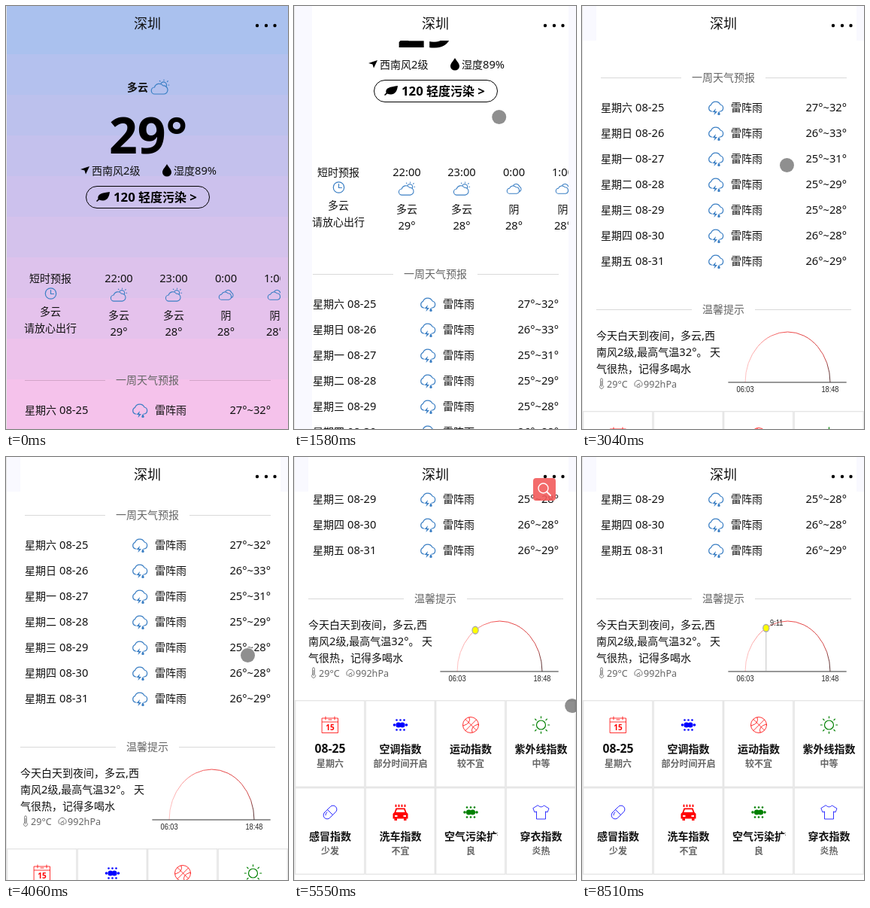
Write an HTML page that moves like this. It is 375 px wide and 562 px high and loops after 8600 ms.

```html
<!DOCTYPE html>
<html lang="zh-CN">
<head>
<meta charset="utf-8">
<title>天气</title>
<style>
html, body { margin: 0; width: 100%; height: 100%; overflow: hidden; background: #fff; }
svg { display: block; width: 375px; height: 562px; }
text { font-family: "Noto Sans", "Noto Sans CJK SC", "Noto Sans CJK", sans-serif; white-space: pre; }
.chart text { font-family: "Liberation Sans", sans-serif; font-size: 10px; fill: #222; }
.line { fill: none; stroke: currentColor; stroke-width: 1.2; stroke-linecap: round; stroke-linejoin: round; }
.thin .line { stroke-width: .8; }
.solid { fill: currentColor; }
</style>
</head>
<body>
<svg id="stage" viewBox="0 0 375 562"></svg>
<script>
const LOOP = 8600, BLUE = '#3b7fc4';

// Latin runs are set slightly larger than the Chinese glyphs around them.
const text = (x, y, str, size = 14, { at = 'middle', fill = '#111', bold = false } = {}) =>
  `<text x="${x}" y="${y}" font-size="${size}" text-anchor="${at}" fill="${fill}" font-weight="${bold ? 700 : 400}">` +
  str.replace(/[!-~°]+/g, run => `<tspan font-size="${size * 1.05}">${run}</tspan>`) + '</text>';
const left = { at: 'start' };
const icon = (name, x, y, color = BLUE, scale = 1) =>
  `<g transform="translate(${x} ${y}) scale(${scale})" color="${color}">${icons[name]}</g>`;
const line = d => `<path class="line" d="${d}"/>`;
const solid = d => `<path class="solid" d="${d}"/>`;
const thin = body => `<g class="thin">${body}</g>`;
const dot = (x, y, r) => `<circle class="solid" cx="${x}" cy="${y}" r="${r}"/>`;
const ring = r => `<circle class="line" r="${r}"/>`;
const rays = (n, a, b) => Array.from({ length: n }, (_, i) =>
  `<path class="line" d="M0-${a}V-${b}" transform="rotate(${i * 360 / n})"/>`).join('');
const rule = (x1, x2, y) => `<path d="M${x1} ${y}H${x2}" stroke="#000" stroke-opacity=".15"/>`;

const icons = {
  sunny: line('M-7 9A4.5 4.5 0 0 1-7.5 0A6.5 6.5 0 0 1 4-2A5.5 5.5 0 0 1 5 9Z') +
    line('M1-5A3.8 3.8 0 1 1 8-1M5-9.2v-.8M9.5-7.5l.8-.8M11-3h.8M0-8l-.7-.7'),
  cloudy: line('M-6 7A4 4 0 0 1-6.5-1A5.6 5.6 0 0 1 3-2.5A4.8 4.8 0 0 1 4 7Z') +
    line('M-1-5A5 5 0 0 1 8-3.5A4 4 0 0 1 8 4'),
  storm: line('M-5 5H-6A4.5 4.5 0 0 1-6.5-3.5A6.8 6.8 0 0 1 6-4A4.6 4.6 0 0 1 6 5H5') +
    solid('M0 1L-4.5 6h3l-1 4L2 5h-3z') + solid('M4 5q3.5 5 0 5t0-5z'),
  clock: ring(7.2) + line('M0-4.5V.5H4'),
  arrow: solid('M6-5L1 5.5L-.5.5L-6-1z'),
  drop: solid('M0-8C2-4 6-1 6 3A6 5.6 0 0 1-6 3C-6-1-2-4 0-8z'),
  leaf: solid('M9-6.5C8 3 3 7-5 4L-8 6.5L-9 5.5L-6.5 3C-8-4-1-5 9-6.5z'),
  thermo: thin(line('M-1.5 2V-6.5a1.5 1.5 0 0 1 3 0V2a2.8 2.8 0 1 1-3 0zM0-4V4')),
  gauge: thin(line('M-4 2.5A5 5 0 1 1 4 2.5M0 0L2-2M-2 3a2.3 2.3 0 1 1 4 0z')),
  calendar: thin(line('M-10.5-9H10.5V10.5H-10.5zM-10.5-4H10.5M-6-11v4M6-11v4M-2-7h4')) +
    '<text y="7" font-size="10" font-weight="600" text-anchor="middle" fill="currentColor">15</text>',
  dots: dot(-2.6, 0, 3.5) + dot(2.6, 0, 3.5) + dot(-8, 0, 1.8) + dot(8, 0, 1.8) +
    [-5, 0, 5].map(x => dot(x, -6.5, 1.3) + dot(x, 6.5, 1.3)).join(''),
  ball: thin(ring(10.5) + line('M-7-7.5L7.5 7M7.5-7L-7 7.5M-2-10Q1-2-10 1M2 10Q-1 2 10-1')),
  sun: `<g stroke-width="1.6">${ring(6)}${rays(8, 9.2, 11.2)}</g>`,
  pill: thin(`<g transform="rotate(-45)"><rect class="line" x="-10.5" y="-5" width="21" height="10" rx="5"/>${line('M0-5V5M-7-1.5Q-6-3-3-3')}</g>`),
  car: solid('M-8 0L-6-5.5H6L8 0L10 2V8.5H8V11H4.5V8.5H-4.5V11H-8V8.5H-10V2z') +
    '<path d="M-6 0L-4.7-3.8H4.7L6 0zM-7.5 4h3.5v2h-3.5zM4 4h3.5v2H4z" fill="#fff"/>' +
    [-6, -2, 2, 6].map(x => solid(`M${x}-11q2.4 4 0 4t0-4z`)).join(''),
  shirt: thin(line('M-4-9Q0-5 4-9L10.5-5L8.5 0L6-1V9H-6V-1L-8.5 0L-10.5-5z'))
};

// Background in ten flat steps from blue to pink.
const mix = (a, b, k) => Math.round(a + (b - a) * k);
const bands = Array.from({ length: 10 }, (_, i) => {
  const y = i ? 10 + 54 * i : 0, k = (y + 27) / 562;
  return `<rect x="1" y="${y}" width="374" height="${i ? 70 : 64}" fill="rgb(${mix(166, 251, k)},${mix(193, 194, k)},${mix(238, 235, k)})"/>`;
}).join('');

const now =
  text(161, 113, '多云', 14, { at: 'start', bold: true }) + icon('sunny', 205, 108) +
  text(189, 196, '29°', 63, { bold: true, fill: '#000' }) +
  icon('arrow', 105, 218, '#000') + text(114, 224, '西南风2级', 14, left) +
  icon('drop', 214, 218, '#000') + text(223, 224, '湿度89%', 14, left) +
  '<rect x="106.5" y="239.5" width="164" height="29" rx="14.5" fill="none" stroke="#000"/>' +
  icon('leaf', 129, 253.5, '#000') + text(143, 260, '120 轻度污染 &gt;', 16, { at: 'start', bold: true, fill: '#000' });

const hours = [[150, '22:00', 'sunny', '多云', 29], [223, '23:00', 'sunny', '多云', 28],
  [292.5, '0:00', 'cloudy', '阴', 28], [357.5, '1:00', 'cloudy', '阴', 28]];
const hourly = '<g clip-path="url(#pane)">' +
  text(59, 367, '短时预报') + icon('clock', 59.5, 382) + text(59, 411, '多云') + text(59, 433, '请放心出行') +
  hours.map(([x, time, kind, label, deg]) => text(x, 367, time) +
    icon(kind, x, 384, BLUE, .9) + text(x, 416, label) + text(x, 438, deg + '°')).join('') + '</g>';

const days = [['六', '25', '27°~32°'], ['日', '26', '26°~33°'], ['一', '27', '25°~31°'], ['二', '28', '25°~29°'],
  ['三', '29', '25°~28°'], ['四', '30', '26°~28°'], ['五', '31', '26°~29°']];
const weekly = rule(25, 132, 497.5) + rule(244, 352, 497.5) + text(188, 502, '一周天气预报', 14, { fill: '#666' }) +
  days.map(([day, date, range], i) => {
    const y = 542 + 34 * i;
    return text(25, y, '星期' + day, 14, left) + text(71, y, '08-' + date, 14, left) +
      icon('storm', 178, y - 5) + text(198, y, '雷阵雨', 14, left) + text(352, y, range, 14, { at: 'end' });
  }).join('');

const R = 61.4;
const tips = rule(19, 146, 805.5) + rule(230, 358, 805.5) + text(188, 810, '温馨提示', 14, { fill: '#666' }) +
  ['今天白天到夜间，多云,西', '南风2级,最高气温32°。 天', '气很热，记得多喝水']
    .map((row, i) => text(19, 845 + 22 * i, row, 14, left)).join('') +
  icon('thermo', 26, 904, '#555', .9) + text(33, 909, '29°C', 12, { at: 'start', fill: '#666' }) +
  icon('gauge', 75, 905, '#555') + text(82, 909, '992hPa', 12, { at: 'start', fill: '#666' }) +
  `<g class="chart" transform="translate(273.5 902) scale(.92 1.091)">
    <path d="M-${R} 0A${R} ${R} 0 0 1 ${R} 0" fill="none" stroke="url(#arc)" stroke-width=".9"/>
    <path d="M-86 0H85" stroke="#333"/>
    <text x="-${R}" y="12" text-anchor="middle">06:03</text>
    <text x="${R}" y="12" text-anchor="middle">18:48</text>
    <g id="mark"><path d="M-31.2-50V-1" stroke="#bbb"/><text x="-25.5" y="-56">9:11</text></g>
    <circle id="sun" r="4.4" fill="#ff0" stroke="#aaa" stroke-width="1.4"/>
  </g>`;

const cells = [['calendar', 'red', '08-25', '星期六'], ['dots', 'blue', '空调指数', '部分时间开启'],
  ['ball', 'red', '运动指数', '较不宜'], ['sun', 'green', '紫外线指数', '中等'],
  ['pill', 'blue', '感冒指数', '少发'], ['car', 'red', '洗车指数', '不宜'],
  ['dots', 'green', '空气污染扩散指数', '良'], ['shirt', 'blue', '穿衣指数', '炎热']];
const grid = cells.map(([name, color, title, note], i) => {
  const x = 1 + 93.5 * (i % 4), y = 940 + 116 * (i >> 2), mid = x + 47, long = title.length > 5;
  return `<rect x="${x + .7}" y="${y + .7}" width="92.1" height="114.6" fill="#fff" stroke="#e6e6e6" stroke-width="1.4"/>` +
    icon(name, mid, y + 33, color) +
    (long ? `<g clip-path="url(#cell)">${text(200, y + 70, title, 14, { at: 'start', bold: true })}</g>`
      : text(mid, y + 70, title, i ? 14 : 15, { bold: true })) +
    text(mid, y + 89, note, 12, { bold: true, fill: '#666' });
}).join('');

const stage = document.getElementById('stage');
stage.innerHTML = `
  <defs>
    <clipPath id="body"><rect y="46" width="375" height="516"/></clipPath>
    <clipPath id="pane"><rect x="24" y="340" width="341" height="120"/></clipPath>
    <clipPath id="cell"><rect x="199" y="1056" width="72" height="116"/></clipPath>
    <linearGradient id="arc"><stop stop-color="#fbb"/><stop offset=".5" stop-color="#e33"/>
      <stop offset=".94" stop-color="#c33"/><stop offset="1" stop-color="#422"/></linearGradient>
  </defs>
  <rect width="375" height="562" fill="#fff"/>
  <path id="sides" fill="#f9f9ff"/>
  <g id="sky">${bands}</g>
  <g clip-path="url(#body)"><g id="page">${now + hourly + weekly + tips + grid}</g></g>
  <path d="M.5 0V562" stroke="#e2e2e2"/>
  ${text(188, 30, '深圳', 18)}
  ${[334, 346, 357.5].map(x => dot(x, 26, 2.2)).join('')}
  <g id="search"><rect x="318" y="28" width="30" height="30" rx="4" fill="#f25b5b" fill-opacity=".9"/>
    <g fill="none" stroke="#fff" stroke-width="1.4" stroke-linecap="round"><circle cx="331.5" cy="41.5" r="6.5"/><path d="M336.5 46.5L341 51" stroke-width="2"/></g></g>
  <g id="touch"><circle r="10.3" fill="none" stroke="#fff" stroke-opacity=".6" stroke-width="1.6"/><circle r="9.5" fill-opacity=".44"/></g>`;

const scrollKeys = [[1220, 0], [1380, 60], [1540, 130], [1750, 185], [2100, 214], [2450, 214], [2600, 256],
  [2850, 350], [3040, 402], [3230, 414], [3500, 420], [4170, 420], [4500, 540], [4800, 605], [5040, 617]];
const touchKeys = [[680, 386, 240], [1190, 277.5, 272.5], [1230, 277.5, 272.5], [1540, 273, 150], [1700, 272, 140],
  [2350, 271.5, 381.5], [2450, 271.5, 381.5], [3040, 272.5, 211.5], [3200, 272, 205], [3500, 290, 290], [3800, 320, 385],
  [4060, 321.5, 263.5], [4170, 323, 255], [4500, 330, 140], [5000, 345, 120], [5550, 369.5, 330.5], [5640, 386, 330],
  [6930, 386, 400], [7090, 292, 529], [7240, 386, 480]];
const searchKeys = [[0, 0], [5000, 1], [6680, .9], [7240, .8], [7860, .55], [8170, .3], [8510, 0]];

function along(keys, t, col = 1) {
  const i = keys.findIndex(key => key[0] > t);
  if (i === 0) return keys[0][col];
  if (i < 0) return keys[keys.length - 1][col];
  const a = keys[i - 1], b = keys[i];
  return a[col] + (b[col] - a[col]) * (t - a[0]) / (b[0] - a[0]);
}
const stepAt = (keys, t) => keys.filter(key => key[0] <= t).pop()[1];
const set = (id, name, value) => document.getElementById(id).setAttribute(name, value);

function draw(t) {
  const scroll = Math.round(along(scrollKeys, t));
  set('page', 'transform', `translate(0 ${-scroll})`);
  set('sky', 'opacity', Math.max(0, 1 - scroll / 130));
  set('sides', 'd', t < 1540 ? 'M1 0H375V562H1z'
    : t < 2450 ? 'M1 0H24V562H1zM365 0H375V562H365z' : 'M1 0H19V46H1zM365 0H375V46H365z');

  const u = along([[4780, -R], [5670, -31.2]], t);
  set('sun', 'transform', `translate(${u} ${-Math.sqrt(R * R - u * u)})`);
  set('sun', 'opacity', t < 4780 ? 0 : 1);
  set('mark', 'opacity', t < 6070 ? 0 : 1);
  set('search', 'opacity', stepAt(searchKeys, t));
  set('touch', 'transform', `translate(${along(touchKeys, t)} ${along(touchKeys, t, 2)})`);
}

const start = performance.now();
(function tick() {
  draw((performance.now() - start) % LOOP);
  requestAnimationFrame(tick);
})();
</script>
</body>
</html>
```
